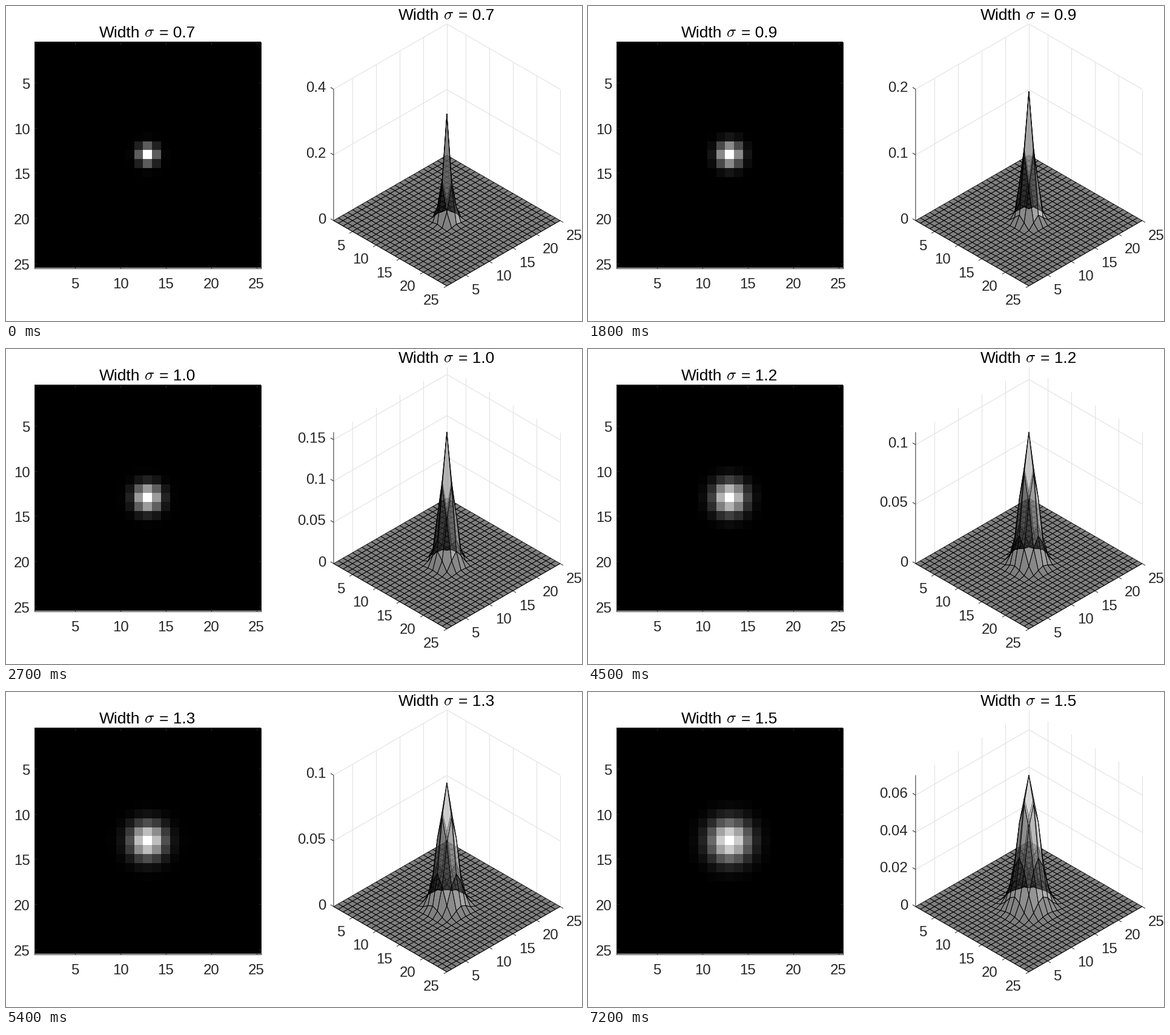
A matplotlib script for the animation above (8000 ms loop, 951 px wide and 521 px high).

```python
import math

import matplotlib as mpl
import matplotlib.pyplot as plt
import numpy as np
from matplotlib.animation import FuncAnimation
from matplotlib.collections import LineCollection, PolyCollection

mpl.rcParams["font.family"] = "Liberation Sans"
mpl.rcParams["mathtext.fontset"] = "cm"

W, H, DPI = 951, 521, 64
PT = 72 / DPI                      # points per pixel
DARK, GRID = "#262626", "#dfdfdf"
N = 25
TICKS = range(5, N + 1, 5)

# Image panel box and isometric box, in pixels
X0, X1, Y0, Y1 = 47, 421, 59.5, 433.5
LEFT, FLOOR = 540.9, 354.9
DX, DY, RISE = 187, 108, 217.3

STEP_FRAMES = 9                    # each width is held for 900 ms
FRAMES, INTERVAL = 80, 100

fig = plt.figure(figsize=(W / DPI, H / DPI), dpi=DPI, facecolor="white")
ax = fig.add_axes([0, 0, 1, 1])


def line(points, color=DARK, zorder=1):
    x, y = zip(*points)
    ax.plot(x, y, color=color, lw=PT, zorder=zorder, solid_capstyle="butt")


def label(x, y, text, ha, size=24, color=DARK):
    """Text whose digits are centred vertically on y."""
    return ax.text(x, y + 0.345 * size, text, ha=ha, va="baseline",
                   fontsize=size * PT, color=color, zorder=5)


def project(a, b, h=0.0):
    """Grid position (1..25) and relative height to screen pixels."""
    u, v = (a - 1) / (N - 1), (b - 1) / (N - 1)
    return LEFT + DX * (u + v), FLOOR + DY * (u - v) - RISE * h


def gaussian(sigma):
    r = np.arange(N) - N // 2
    g = np.exp(-r**2 / (2 * sigma**2))
    z = np.outer(g, g)
    return z / z.sum()


def z_axis(peak):
    """Upper limit and tick step; tight when rounding up wastes over 20 %."""
    steps = [m * 10.0**e for e in (-3, -2, -1) for m in (1, 2, 5)]
    step = next(s for s in steps if math.ceil(peak / s) <= 3)
    top = step * math.ceil(peak / step)
    if peak / top >= 0.8:
        return top, step
    return peak, next(s for s in steps if peak / s <= 3.6)


def title(x, y):
    label(x, y, "Width", "left", 26.4, "black")
    label(x + 82.5, y, r"$\sigma$", "center", 26.4, "black")
    return label(x + 158.5, y, "", "right", 26.4, "black")


# Image panel
image = ax.imshow(np.zeros((N, N)), cmap="gray", vmin=0, vmax=1,
                  extent=(X0, X1, Y1, Y0), origin="upper",
                  interpolation="nearest", aspect="auto", zorder=1)
line([(X0, Y0), (X1, Y0), (X1, Y1), (X0, Y1), (X0, Y0)], zorder=2)
for t in TICKS:
    x = X0 + (t - 0.5) * (X1 - X0) / N
    y = Y0 + (t - 0.5) * (Y1 - Y0) / N
    for edge, d in ((Y0, 4), (Y1, -4)):
        line([(x, edge), (x, edge + d)], zorder=2)
    for edge, d in ((X0, 4), (X1, -4)):
        line([(edge, y), (edge + d, y)], zorder=2)
    label(x, 458.8, str(t), "center")
    label(40, y + 1.6, str(t), "right")

# Walls, axes and ticks of the surface panel
for t in TICKS:
    line([project(t, N), project(t, N, 1)], GRID, 0.5)
    line([project(1, t), project(1, t, 1)], GRID, 0.5)
    x, y = project(t, 1)
    line([(x, y), (x - 5, y + 3)])
    label(x - 12, y + 22.5, str(t), "right")
    x, y = project(N, t)
    line([(x, y), (x + 5, y + 3)])
    label(x + 10, y + 23.5, str(t), "left")
line([project(1, 1, 1), project(1, 1), project(N, 1), project(N, N)])

z_grid = LineCollection([], colors=GRID, linewidths=PT, zorder=0.6)
z_ticks = LineCollection([], colors=DARK, linewidths=PT, zorder=1)
z_labels = [label(528, 0, "", "right") for _ in range(4)]

# Faces are painted from the far corner to the near one
A, B = np.meshgrid(np.arange(N - 1), np.arange(N - 1), indexing="ij")
order = np.argsort((A - B).ravel(), kind="stable")
A, B = A.ravel()[order], B.ravel()[order]
CORNER_A = np.stack([A, A + 1, A + 1, A], axis=1)
CORNER_B = np.stack([B, B, B + 1, B + 1], axis=1)

surface = PolyCollection([], edgecolors="black", linewidths=0.8 * PT,
                         joinstyle="round", zorder=3)
for artist in (z_grid, z_ticks, surface):
    ax.add_collection(artist, autolim=False)

titles = [title(154, 42.4), title(648, 13.4)]

ax.set_xlim(0, W)
ax.set_ylim(H, 0)
ax.axis("off")


def update(frame):
    sigma = 0.7 + 0.1 * (frame // STEP_FRAMES)
    z = gaussian(sigma)
    peak = z.max()
    top, step = z_axis(peak)

    for text in titles:
        text.set_text(f"= {sigma:.1f}")
    image.set_data(z / peak)

    x, y = project(CORNER_A + 1, CORNER_B + 1, z[CORNER_A, CORNER_B] / top)
    surface.set_verts(np.stack([x, y], axis=2))
    shade = z[A, B] / peak
    surface.set_facecolor(
        np.stack([shade, shade, shade, np.full_like(shade, 0.5)], axis=1))

    values = step * np.arange(int(top / step + 1e-6) + 1)
    z_grid.set_segments([[project(a, b, v / top)
                          for a, b in ((1, 1), (1, N), (N, N))]
                         for v in values])
    ticks = []
    for text in z_labels:
        text.set_text("")
    for text, v in zip(z_labels, values):
        x, y = project(1, 1, v / top)
        ticks.append([(x, y), (x - 5, y - 3)])
        text.set_text(f"{v:.3g}")
        text.set_y(y - 3.6 + 0.345 * 24)
    z_ticks.set_segments(ticks)
    return [image, surface, z_grid, z_ticks, *titles, *z_labels]


anim = FuncAnimation(fig, update, frames=FRAMES, interval=INTERVAL,
                     repeat=True, repeat_delay=0, blit=False)
plt.show()
```
